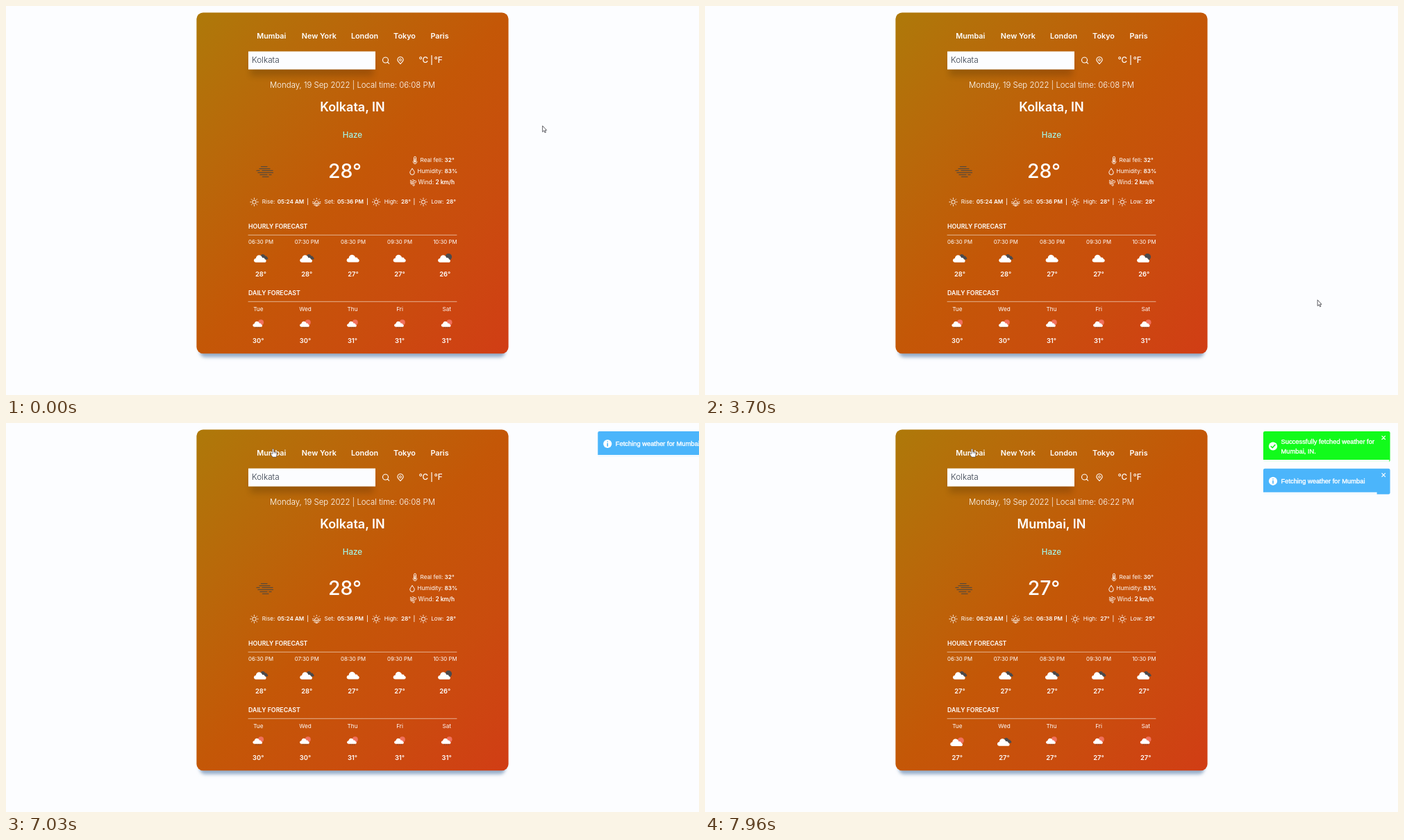
An HTML page that plays this animation: 998 px wide and 561 px high, repeating every 8 s.

```html
<!DOCTYPE html>
<html lang="en">
<head>
<meta charset="utf-8">
<title>Weather card</title>
<style>
  html, body { margin: 0; width: 100%; height: 100%; overflow: hidden; background: #fcfdff; }
  svg { position: absolute; left: 0; top: 0; }
  text { font-family: Inter, "Open Sans", sans-serif; white-space: pre; }
  .toast text { font-family: "Liberation Sans", Arial, sans-serif; stroke: #fff; stroke-width: .35px; }
</style>
</head>
<body>
<svg width="998" height="561" viewBox="0 0 998 561">
  <defs>
    <linearGradient id="warm" x1="0" y1="0" x2="1" y2="1">
      <stop offset="0" stop-color="#ae790a"/>
      <stop offset=".25" stop-color="#b9680a"/>
      <stop offset=".5" stop-color="#c45707"/>
      <stop offset=".75" stop-color="#ca4c0e"/>
      <stop offset="1" stop-color="#d13d15"/>
    </linearGradient>
    <filter id="soft" x="-10%" y="-60%" width="120%" height="220%"><feGaussianBlur stdDeviation="2.8"/></filter>
    <filter id="wide" x="-20%" y="-90%" width="140%" height="300%"><feGaussianBlur stdDeviation="5"/></filter>
  </defs>
  <rect x="279" y="460" width="440" height="46.5" rx="8" fill="#94acc8" filter="url(#soft)"/>
  <rect x="274.4" y="9.4" width="449.2" height="491.8" rx="9.4" fill="url(#warm)"/>
  <rect x="352" y="78" width="177" height="23" fill="#000" opacity=".16" filter="url(#wide)"/>
  <rect x="349" y="65.5" width="183" height="26" fill="#fcfdff"/>
  <g id="art" fill="#fff"></g>
</svg>
<script>
const LOOP = 8000, CLICK = 6736, SWAP = 7220;
const COLS = { hour: [367, 433.3, 500, 567, 632.3], day: [363.3, 431, 499, 567, 634.7] };

const txt = (x, y, s, size, weight = 400, anchor = 'middle', fill = '#fff') =>
  `<text x="${x}" y="${y}" font-size="${size}" font-weight="${weight}" text-anchor="${anchor}" fill="${fill}">${s}</text>`;
const at = (x, y, body, k = 1) => `<g transform="translate(${x} ${y}) scale(${k})">${body}</g>`;
const line = (d, w = 1, color = '#fff') =>
  `<path d="${d}" fill="none" stroke="${color}" stroke-width="${w}" stroke-linecap="round" stroke-linejoin="round"/>`;
const dot = (x, y, r, fill = '#fff') => `<circle cx="${x}" cy="${y}" r="${r}" fill="${fill}"/>`;

// Weather icons, each centred on 0,0
const puff = fill => `<path fill="${fill}" d="M-6.2 5.5C-10.3 5.5-10.4 0-6.4-.3C-6-4.2-2.2-6.4.8-4.4C2.2-3.6 2.8-2.4 3-1.2C5.2-2 6.6-.8 6.7 .8C9.6 1.2 9.4 5.5 6.4 5.5Z"/>`;
const DARK = '#4b4a4c', RED = '#f0705c';
const ICONS = {
  cloud: puff('#fff'),
  broken: at(4, -2.4, puff(DARK), .72) + at(-.9, .4, puff('#fff'), .98),
  night: dot(5, -2.2, 4.8, DARK) + at(-1, .4, puff('#fff'), .98),
  sunny: dot(5, -2, 4.6, RED) + at(-.9, .6, puff('#fff'), .98),
  rain: dot(3.8, -1.8, 4, RED) + line('M-2.6 4.8l-.7 1.6M.4 4.8l-.7 1.6M3.2 4.8l-.7 1.6', .7, DARK) +
        at(-.8, .6, puff('#fff'), .76)
};

const sunRays = [0, 1, 2, 3, 4, 5, 6, 7].map(i => {
  const a = i * Math.PI / 4, c = Math.cos(a), s = Math.sin(a);
  return `M${c * 4.6} ${s * 4.6}L${c * 5.6} ${s * 5.6}`;
}).join('');
const sun = `<circle r="2.7" fill="none" stroke="#fff"/>` + line(sunRays, 1);
const sunset = line('M-2.7 1.6A2.8 2.8 0 1 1 2.7 1.6M-5.5 2H5.5M-3.5 4.2H3.5M0-5.5V-4.6M-4-4l.6.6M4-4l-.6.6M-5.6-.2h.9M5.6-.2h-.9M-1.2 5.6h2.4', 1);
const search = `<circle cx="-.5" cy="-.5" r="4" fill="none" stroke="#fff" stroke-width="1.1"/>` + line('M2.5 2.5L4.7 4.7', 1.1);
const pin = line('M0 5C-2.4 2.6-4.1 1.2-4.1-.9A4.1 4.1 0 0 1 4.1-.9C4.1 1.2 2.4 2.6 0 5Z', 1.1) +
  `<circle cy="-.8" r="1.5" fill="none" stroke="#fff"/>`;
const thermo = line('M-1.5 .8V-3.3A1.5 1.5 0 0 1 1.5-3.3V.8A2.6 2.6 0 1 1-1.5 .8Z', .9) + line('M0-2V2', .9) + dot(0, 2.5, 1.3);
const drop = line('M0-4.4C1.8-2.2 3.2-.6 3.2 1.2A3.2 3.2 0 0 1-3.2 1.2C-3.2-.6-1.8-2.2 0-4.4Z', 1);
const wind = line('M-4.2-1.2H-.4A1.4 1.4 0 1 0-1.6-3.3M-4.2 .5H2.6A1.6 1.6 0 1 0 1.2-2M-3.4 2.2H.4A1.3 1.3 0 1 1-.8 4M-4.2-3h1', .9);
const haze = line('M367.5 231.5h8.5M365 234.5h15M369 237.4h15M361 237.4h4M363 240.4h21.5M366 243.4h10M379 243.4h3M369.5 246.3h8.5', 1.25, '#5a4a3a');

const cities = [
  { name: 'Kolkata, IN', time: '06:08', temp: 28, feel: 32, rise: '05:24', set: '05:36', high: 28, low: 28,
    hourT: [28, 28, 27, 27, 26], hourI: ['broken', 'broken', 'cloud', 'cloud', 'night'],
    dayT: [30, 30, 31, 31, 31], dayI: ['rain', 'rain', 'rain', 'rain', 'rain'] },
  { name: 'Mumbai, IN', time: '06:22', temp: 27, feel: 30, rise: '06:26', set: '06:38', high: 27, low: 25,
    hourT: [27, 27, 27, 27, 27], hourI: ['broken', 'broken', 'broken', 'broken', 'broken'],
    dayT: [27, 27, 27, 27, 27], dayI: ['sunny', 'broken', 'rain', 'rain', 'rain'] }
];

const bold = s => `<tspan font-weight="600">${s}</tspan>`;
const cityView = (c, i) => `<g id="city${i}">` +
  txt(499, 117.6, `Monday, 19 Sep 2022 | Local time: ${c.time} PM`, 11.4, 300) +
  txt(499, 152, c.name, 18, 600) +
  txt(488, 248.4, `${c.temp}°`, 28.4, 500) +
  txt(596.5, 224.8, `Real fell: ${bold(c.feel + '°')}`, 8.2, 400, 'start') +
  txt(410, 285.3, `${c.rise} AM`, 8.1, 600) + txt(496, 285.3, `${c.set} PM`, 8.1, 600) +
  txt(576, 285.3, `${c.high}°`, 8.2, 600) + txt(641, 285.3, `${c.low}°`, 8.2, 600) +
  COLS.hour.map((x, k) => at(x, 364, ICONS[c.hourI[k]]) + txt(x, 389.7, `${c.hourT[k]}°`, 9.4, 600)).join('') +
  COLS.day.map((x, k) => at(x, c.dayI[k] === 'rain' ? 458 : 460, ICONS[c.dayI[k]]) + txt(x, 486.2, `${c.dayT[k]}°`, 9.4, 600)).join('') +
  '</g>';

const fixed =
  [['Mumbai', 382.3], ['New York', 450.8], ['London', 516.5], ['Tokyo', 574], ['Paris', 624.5]]
    .map(([s, x]) => txt(x, 47, s, 10.8, 600)).join('') +
  txt(354, 82.3, 'Kolkata', 11.8, 300, 'start', '#333c4a') +
  at(547, 78.5, search) + at(568, 78.5, pin) +
  txt(601.3, 82, '°C', 11.7, 500) + txt(613, 82, '|', 11.7, 500) + txt(622.5, 82, '°F', 11.7, 500) +
  txt(499, 189.7, 'Haze', 11.6, 500, 'middle', '#a4f4e4') + haze +
  at(589, 222, thermo) + at(585, 239, drop) + at(586.5, 254.5, wind) +
  txt(592.3, 241.3, `Humidity: ${bold('83%')}`, 8.2, 400, 'start') +
  txt(593.5, 257.3, `Wind: ${bold('2 km/h')}`, 8.3, 400, 'start') +
  at(357.5, 282.7, sun) + at(447.3, 282.7, sunset) + at(533.2, 282.7, sun) + at(601, 282.7, sun) +
  [['Rise:', 378], ['Set:', 466], ['High:', 554.7], ['Low:', 621.3]].map(([s, x]) => txt(x, 285.3, s, 8.1)).join('') +
  [434.6, 520.3, 588].map(x => txt(x, 285.3, '|', 8.2, 500)).join('') +
  txt(349, 321.4, 'HOURLY FORECAST', 8.8, 600, 'start') + txt(349, 417.4, 'DAILY FORECAST', 8.8, 600, 'start') +
  line('M349 330.3H649M349 426.3H649', .7, '#f3dccb') +
  COLS.hour.map((x, k) => txt(x, 343.4, `${('0' + (6 + k)).slice(-2)}:30 PM`, 7.8)).join('') +
  ['Tue', 'Wed', 'Thu', 'Fri', 'Sat'].map((s, k) => txt(COLS.day[k], 439.5, s, 8.2)).join('');

// Toasts: drawn in place at x 804, top y 0
const toast = (id, h, color, lines, glyph) => `<g id="${id}" class="toast">
  <rect x="804" width="182.6" height="${h}" rx="2.3" fill="${color}"/>` +
  dot(818, (h - 3) / 2 + 1, 6.1) + at(818, (h - 3) / 2 + 1, line(glyph, 1.6, color)) +
  lines.map((s, k) => txt(829.5, h / 2 + 2.9 + (k - (lines.length - 1) / 2) * 14, s, 9.36, 400, 'start')).join('') +
  line('M974.9 6.9l4.6 4.6M979.5 6.9l-4.6 4.6', 1.2) +
  `<rect class="bar" x="803.5" y="${h - 3}" height="3.3" fill="#fcfdff" opacity=".94"/></g>`;

const art = document.getElementById('art');
art.innerHTML = fixed + cities.map(cityView).join('') +
  toast('info', 37, '#4bb5fb', ['Fetching weather for Mumbai'], 'M0-3h0M0-.4V3.2') +
  toast('done', 44, '#12fb1b', ['Successfully fetched weather for', 'Mumbai, IN.'], 'M-2.8 .2L-.8 2.2L2.9-2') +
  `<g id="arrow"><path d="M.4 .3V9L2.4 7.2L3.8 10.2L5.2 9.6L3.8 6.7H6.3Z" fill="#fff" stroke="#2b2b33" stroke-width=".75" stroke-linejoin="round"/></g>
   <g id="hand"><path d="M-1 6.5V.8A.9 .9 0 0 1 .9 .8V4L4.2 4.6Q5.6 5 5.5 6.5L4.8 11.6H-.6L-3.2 7.6Q-3.4 6-1.8 6.6L-1 7.4Z" fill="#fff" stroke="#4c4650" stroke-width=".6" stroke-linejoin="round"/>${line('M1 4v2.4M2.6 4.4v2M4.1 4.8v1.7', .4, '#4c4650')}</g>`;

const $ = id => document.getElementById(id);
const show = (el, on) => el.setAttribute('display', on ? 'inline' : 'none');
const move = (el, x, y) => el.setAttribute('transform', `translate(${x.toFixed(2)} ${y.toFixed(2)})`);

function track(keys, t, ease = p => p) {
  if (t <= keys[0][0]) return keys[0].slice(1);
  for (let i = 1; i < keys.length; i++) {
    const [a, ...from] = keys[i - 1], [b, ...to] = keys[i];
    if (t < b) return from.map((v, k) => v + (to[k] - v) * ease((t - a) / (b - a)));
  }
  return keys[keys.length - 1].slice(1);
}

// cubic-bezier(.215, .61, .355, 1)
function easeOut(p) {
  const curve = (u, a, b) => 3 * u * (1 - u) * (1 - u) * a + 3 * u * u * (1 - u) * b + u * u * u;
  let lo = 0, hi = 1;
  for (let i = 0; i < 24; i++) {
    const mid = (lo + hi) / 2;
    curve(mid, .215, .355) < p ? lo = mid : hi = mid;
  }
  return curve(lo, .61, 1);
}

const BOUNCE = [[0, 1755], [420, -14.6], [525, 5.85], [630, -2.9], [700, 0]];
// time, x, y of the pointer tip
const PATH = [
  [1930, 772.3, 172.5], [1990, 758, 183], [2030, 736, 200], [2060, 720, 210.5], [2499, 720, 210.5],
  [2500, 821, 339.5], [2630, 821, 339.5], [2800, 826.5, 345], [3130, 826.5, 345], [3230, 826.5, 341.5],
  [3530, 826.5, 341.5], [3900, 946, 519], [4060, 935, 480], [4240, 860, 360], [4370, 780, 282],
  [4500, 557, 165], [4660, 580, 110], [4830, 623, 71], [4970, 623, 71],
  [5220, 480, 70], [5400, 294, 62], [5540, 372, 47], [5660, 410.5, 43.5], [5760, 396, 40],
  [5800, 396, 40], [5960, 341, 55], [6080, 370, 38], [6160, 382, 38], [6340, 382, 38], [6400, 384.6, 37.5]
];

function placeToast(id, t, start, y) {
  const el = $(id), age = t - start;
  show(el, age >= 0);
  if (age < 0) return;
  move(el, track(BOUNCE, age, easeOut)[0], y);
  // the bar starts to shrink once the entrance is over
  const left = 1 - Math.max(0, age - 700) / 5000;
  el.querySelector('.bar').setAttribute('width', (183.4 * left).toFixed(2));
}

function draw(t) {
  const swapped = t >= SWAP;
  show($('city0'), !swapped);
  show($('city1'), swapped);
  placeToast('info', t, CLICK, swapped ? 65.8 : 12);
  placeToast('done', t, SWAP, 12);
  const [x, y] = track(PATH, t);
  const over = x > 360 && x < 404 && y > 35 && y < 51;
  show($('arrow'), !over);
  show($('hand'), over);
  move($(over ? 'hand' : 'arrow'), x, y);
}

const begin = performance.now();
function tick() {
  draw((performance.now() - begin) % LOOP);
  requestAnimationFrame(tick);
}
draw(0);
requestAnimationFrame(tick);
</script>
</body>
</html>
```
